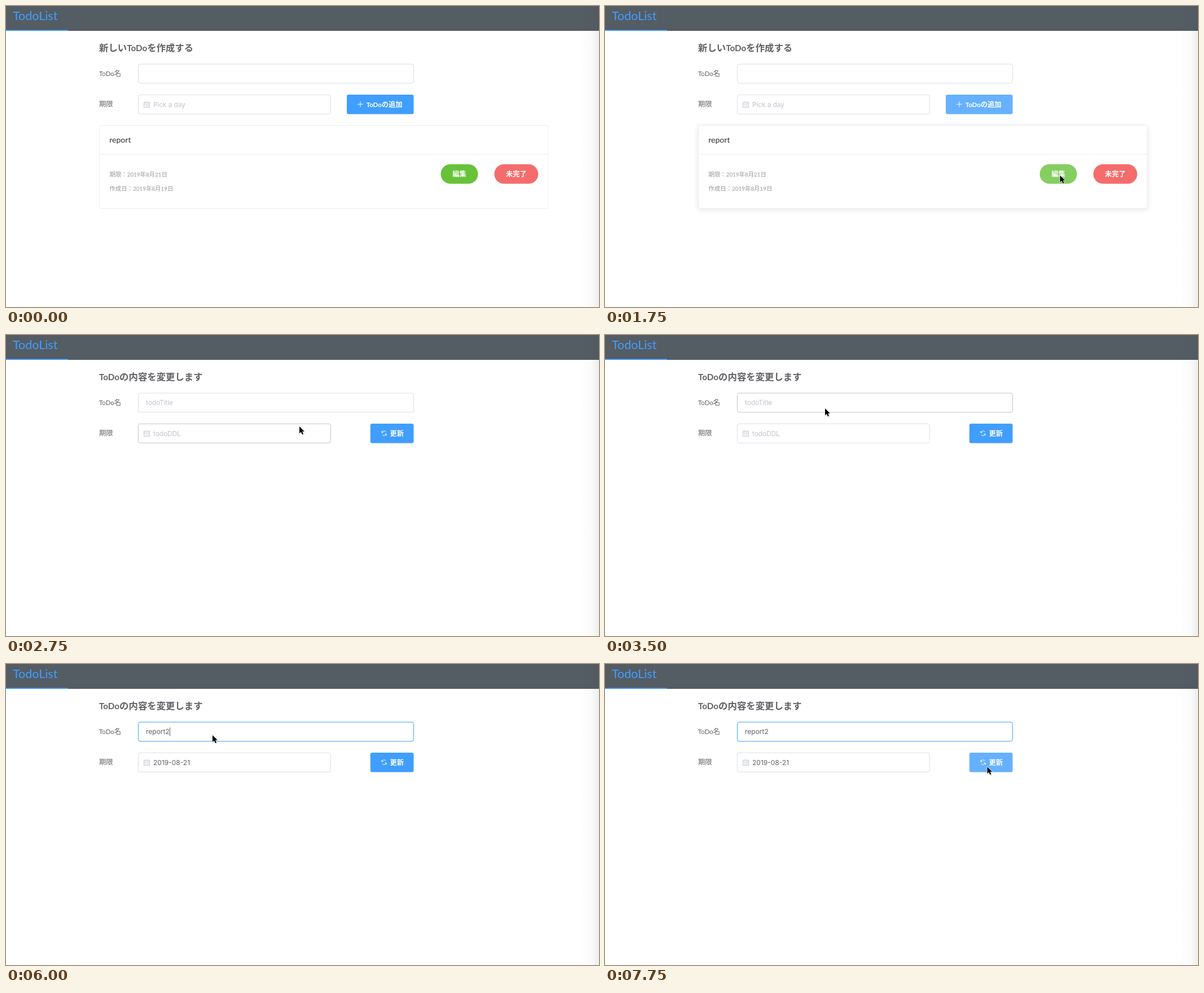
An HTML page for the animation above (8000 ms loop, 1051 by 533 pixels).

```html
<!DOCTYPE html>
<html lang="ja">
<head>
<meta charset="utf-8">
<title>Todo editor</title>
<style>
  html, body { margin: 0; width: 100%; height: 100%; overflow: hidden; background: #fff; }
  svg { display: block; width: 100%; height: 100%; }
  text { font: 12.3px Lato, "Noto Sans CJK JP", "Noto Sans CJK", sans-serif; fill: #606266; white-space: pre; }
  .latin { font-size: .93em; }
  .brand { font-size: 21.5px; fill: #409eff; }
  .heading { font-size: 16.4px; font-weight: 700; }
  .button { font-weight: 700; fill: #fff; }
  .item { font-size: 14px; fill: #303133; }
  .date { font-family: Lato, "Noto Sans CJK SC", "Noto Sans CJK", sans-serif; font-size: 10.5px; fill: #999; }
  .value { font-family: Inter, sans-serif; font-size: 12px; }
  .empty { fill: #c0c4cc; letter-spacing: -.15px; }
  .status { font-size: 10.5px; fill: #555; }
  .field { fill: #fff; stroke: #dcdfe6; }
  .line { fill: none; stroke: #c0c4cc; }
  .icon { fill: none; stroke: #fff; }
</style>
</head>
<body>
<svg viewBox="0 0 1051 533" xmlns="http://www.w3.org/2000/svg">
  <defs>
    <linearGradient id="edge">
      <stop offset="0" stop-color="#303840" stop-opacity="0"/>
      <stop offset=".6" stop-color="#303840" stop-opacity=".025"/>
      <stop offset="1" stop-color="#303840" stop-opacity=".09"/>
    </linearGradient>
    <filter id="blur" x="-10%" y="-30%" width="120%" height="160%"><feGaussianBlur stdDeviation="5.3"/></filter>
    <filter id="soft" x="-50%" y="-50%" width="200%" height="200%"><feGaussianBlur stdDeviation="1"/></filter>
    <path id="arrow" d="M0 0V12.2L2.9 9.6L4.9 14.1L7 13.2L5.1 8.8H8.8Z"/>
  </defs>
  <rect width="1051" height="533" fill="#fff"/>
  <rect width="1051" height="44" fill="#545c64"/>
  <rect y="42.3" width="110" height="1.8" fill="#409eff"/>
  <text class="brand" x="12" y="25">TodoList</text>

  <text class="mixed" x="165" y="123.5">ToDo名</text>
  <text x="165" y="178">期限</text>
  <rect id="titleBox" class="field" x="234.5" y="102.9" width="488" height="34" rx="3.5"/>
  <rect id="dayBox" class="field" x="234.5" y="157.2" width="341" height="34" rx="3.5"/>
  <path class="line" stroke-width=".9" d="M244.5 170.5h10v9h-10zM244.5 173.3h10M247 169v2.5M252 169v2.5M246.3 175.5h1.6m1 0h1.6m1 0h1.6M246.3 177.6h1.6m1 0h1.6m1 0h1.6"/>
  <text id="title" class="value" x="248" y="124.3"></text>
  <text id="day" class="value" x="261" y="178.6"></text>
  <path id="caret" d="M290.5 112.5v15" stroke="#606266"/>

  <g id="listPage">
    <text class="heading mixed" x="165" y="80.3">新しいToDoを作成する</text>
    <rect id="add" x="604" y="157" width="118.5" height="34.5" rx="3"/>
    <path class="icon" d="M623 174h10M628 169v10"/>
    <text class="button mixed" x="638.7" y="178.8">ToDoの追加</text>

    <rect id="shadow" x="165.5" y="213.3" width="795.5" height="147" rx="3.5" opacity="0" filter="url(#blur)"/>
    <rect x="165.5" y="211.5" width="795.5" height="147" rx="3.5" fill="#fff" stroke="#ebeef5"/>
    <path d="M166 262.5h795" stroke="#ebeef5"/>
    <text class="item" x="183.3" y="241.7">report</text>
    <text class="date mixed" x="183.3" y="301.8">期限：2019年8月21日</text>
    <text class="date mixed" x="183.3" y="326.8">作成日：2019年8月19日</text>
    <rect id="edit" x="770.5" y="280.3" width="66" height="34.5" rx="17.25"/>
    <text class="button" x="803.5" y="302" text-anchor="middle">編集</text>
    <rect x="865.5" y="280.3" width="77.8" height="34.5" rx="17.25" fill="#f56c6c"/>
    <text class="button" x="904.4" y="302" text-anchor="middle">未完了</text>
  </g>

  <g id="editPage">
    <text class="heading mixed" x="165" y="80.3">ToDoの内容を変更します</text>
    <rect id="update" x="645.8" y="157" width="76.7" height="34.5" rx="3"/>
    <path class="icon" d="M666.2 173a4 4 0 0 1 7.2-1.4M674 175.2a4 4 0 0 1-7.2 1.4M666 170v3h2.8M674.2 178.2v-3h-2.8"/>
    <text class="button" x="680.4" y="178.8">更新</text>
  </g>

  <g id="status">
    <rect x="-5" y="528" width="376" height="20" rx="3" fill="#777" opacity=".5" filter="url(#soft)"/>
    <rect x="-5" y="527.4" width="375.7" height="20" rx="3" fill="#fdfdfd" stroke="#b4b4b4"/>
    <text class="status" x="1" y="540.3">在等待 the todo service to send a reply 的响应</text>
  </g>

  <rect x="1018" width="33" height="533" fill="url(#edge)"/>
  <g id="cursor">
    <use href="#arrow" x=".5" y="1.5" opacity=".35" filter="url(#soft)"/>
    <use href="#arrow" fill="#000" stroke="#fff" stroke-width="1.6" stroke-linejoin="round" paint-order="stroke"/>
  </g>
</svg>
<script>
  const LOOP = 8000, STEP = 250;
  const BLUE = "#409eff", LIGHT_BLUE = "#66b1ff";
  const ui = {};
  document.querySelectorAll("svg > [id], svg g [id]").forEach(el => ui[el.id] = el);

  // Latin runs sit slightly smaller than the kana and kanji beside them.
  document.querySelectorAll(".mixed").forEach(el => {
    el.innerHTML = el.textContent.replace(/[A-Za-z0-9]+/g, '<tspan class="latin">$&</tspan>');
  });

  // Pointer stops: time, x, y.
  const stops = [
    [250, 668, 175], [500, 672, 178], [750, 686, 192], [1000, 735, 256],
    [1250, 783, 303], [1500, 800, 301], [1750, 806.5, 300], [2000, 800, 300],
    [2250, 750, 300], [2500, 610, 184], [2750, 520, 162], [3000, 440, 136],
    [3250, 400, 122], [3500, 390, 130], [3750, 386, 150], [4000, 381, 200],
    [4250, 379, 230], [4500, 377, 142], [4750, 364, 126], [5000, 358, 121],
    [6000, 366, 126], [6250, 368, 132], [6500, 395, 160], [6750, 470, 184],
    [7000, 562, 187], [7250, 630, 185], [7500, 668, 183], [7750, 677.5, 182]
  ];

  const set = (el, attr, value) => el.setAttribute(attr, value);
  const show = (el, on) => set(el, "visibility", on ? "visible" : "hidden");
  const within = (t, from, to) => t >= from && t < to;

  function setValue(el, text, empty) {
    if (el.textContent !== text) el.textContent = text;
    el.classList.toggle("empty", empty);
  }

  function boxColor(el, p, focused) {
    if (focused) return BLUE;
    const x = +el.getAttribute("x"), y = +el.getAttribute("y");
    const w = +el.getAttribute("width"), h = +el.getAttribute("height");
    const over = within(p[1], x, x + w) && within(p[2], y, y + h);
    return over ? "#c0c4cc" : "#dcdfe6";
  }

  function render(time) {
    const t = Math.floor(time / STEP) * STEP;
    const editing = t >= 2000, loaded = t >= 4000, focused = t >= 5000;
    const pointer = stops.filter(s => s[0] <= t).pop() || [0, 0, 0];

    show(ui.cursor, t >= 250 && !within(t, 5250, 6000));
    set(ui.cursor, "transform", `translate(${pointer[1]} ${pointer[2]})`);

    show(ui.listPage, !editing);
    show(ui.editPage, editing);
    show(ui.status, within(t, 2000, 2500));
    set(ui.add, "fill", t < 250 ? BLUE : LIGHT_BLUE);
    set(ui.edit, "fill", t < 1500 ? "#67c23a" : "#85ce61");
    set(ui.update, "fill", t < 7500 ? BLUE : LIGHT_BLUE);
    set(ui.shadow, "opacity", t < 1500 ? 0 : t < 1750 ? .06 : .11);

    const name = t >= 5500 ? "report2" : "report";
    setValue(ui.title, loaded ? name : editing ? "todoTitle" : "", !loaded);
    setValue(ui.day, loaded ? "2019-08-21" : editing ? "todoDDL" : "Pick a day", !loaded);
    ui.titleBox.style.stroke = boxColor(ui.titleBox, pointer, focused);
    ui.dayBox.style.stroke = boxColor(ui.dayBox, pointer, false);

    show(ui.caret, within(t, 5000, 6250) || within(t, 6750, 7250));
    set(ui.caret, "transform", `translate(${t < 5500 ? -7 : 0} 0)`);
  }

  const start = performance.now();
  function tick() {
    render((performance.now() - start) % LOOP);
    requestAnimationFrame(tick);
  }
  tick();
</script>
</body>
</html>
```
